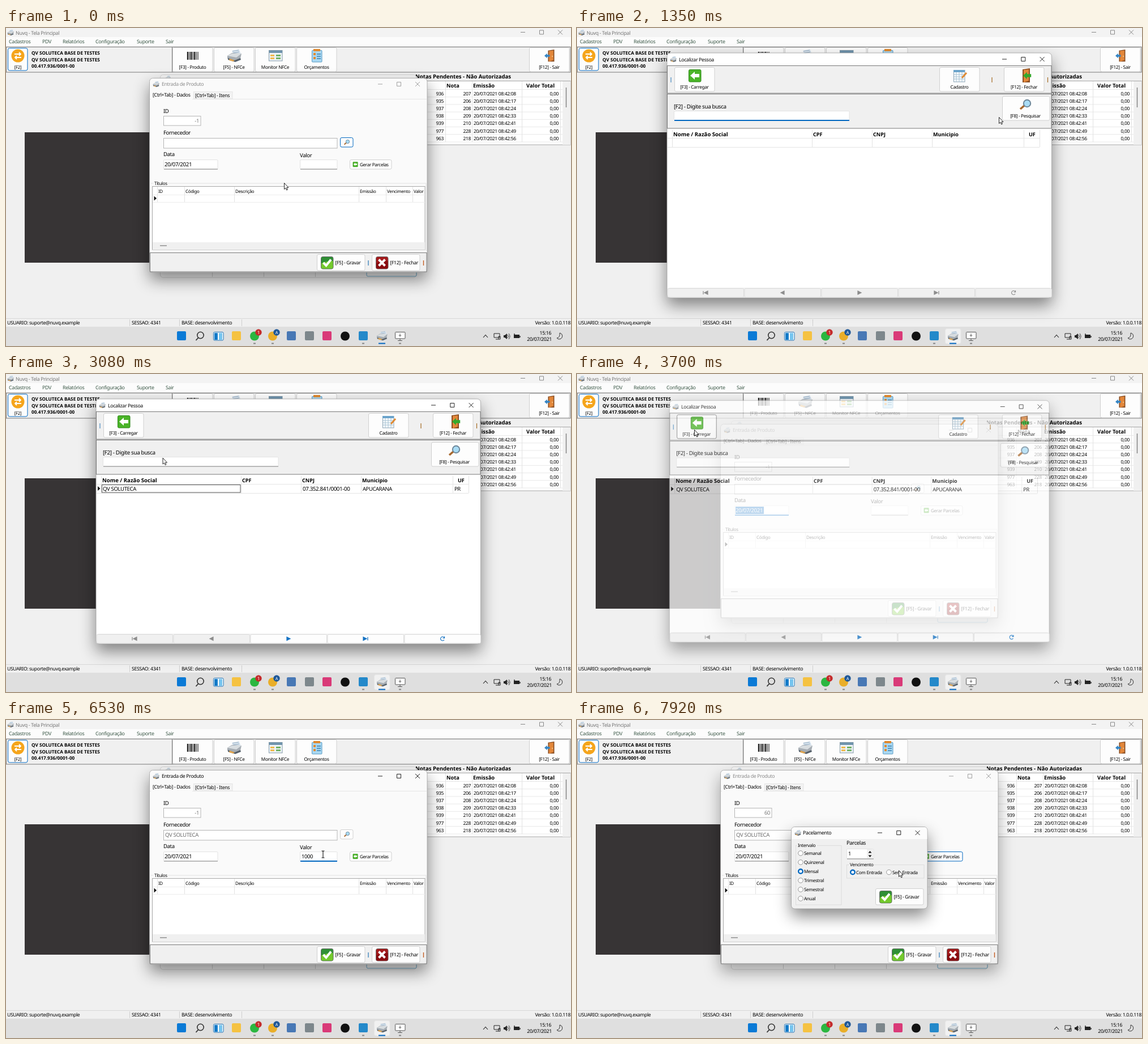
An HTML page for the animation above (7.99 s loop, 998x561 px).

```html
<!DOCTYPE html>
<html lang="pt-BR">
<head>
<meta charset="utf-8">
<title>Entrada de Produto</title>
<style>
html, body { margin: 0; width: 100%; height: 100%; overflow: hidden; background: #f0f0f0 }
svg { display: block; width: 100vw; height: 100vh }
text { font-family: "Noto Sans", "Open Sans", sans-serif; font-weight: 500; letter-spacing: -.04em; text-rendering: geometricPrecision; white-space: pre }
.b { font-weight: 700; letter-spacing: 0 }
.e { text-anchor: end }
.m { text-anchor: middle }
</style>
</head>
<body>
<svg id="stage" viewBox="0 0 998 561" xmlns="http://www.w3.org/2000/svg"></svg>
<script>
const LOOP = 7990, BLUE = '#0067c0', GRAY = '#f0f0f0', EDGE = '#d0d0d0', COMPANY = 'QV SOLUTECA';
const stage = document.getElementById('stage');

// Drawing helpers: every one returns SVG markup.
const text = (x, y, s, size = 8.3, cls = '', fill = '#000', id = '') =>
  `<text x="${x}" y="${y}" font-size="${size}" class="${cls}" fill="${fill}" id="${id}">${s}</text>`;
const box = (x1, y1, x2, y2, fill, stroke = 'none', r = 0, id = '') => {
  const o = stroke == 'none' ? 0 : .5;
  return `<rect x="${x1 + o}" y="${y1 + o}" width="${x2 - x1 - o}" height="${y2 - y1 - o}" rx="${r}" fill="${fill}" stroke="${stroke}" id="${id}"/>`;
};
const path = (d, stroke = '#888', w = 1, fill = 'none') => `<path d="${d}" stroke="${stroke}" stroke-width="${w}" fill="${fill}"/>`;
const shape = (d, fill) => path(d, 'none', 0, fill);
const circle = (x, y, r, fill, stroke = 'none', w = 1) => `<circle cx="${x}" cy="${y}" r="${r}" fill="${fill}" stroke="${stroke}" stroke-width="${w}"/>`;
const group = (id, s, attr = '') => `<g id="${id}" ${attr}>${s}</g>`;
const at = (x, y, s, k = 1) => `<g transform="translate(${x} ${y}) scale(${k})">${s}</g>`;
const verticals = (xs, y1, y2, c = '#e2e2e2') => path(xs.map(x => `M${x + .5} ${y1}V${y2}`).join(''), c);
const field = (x1, y1, x2, y2) => box(x1, y1, x2, y2, '#fff', '#e3e3e3', 1.5) + path(`M${x1 + 1} ${y2}H${x2}`, '#858585');
const button = (x1, y1, x2, y2, id) => box(x1, y1, x2, y2, '#fdfdfd', EDGE, 2.5, id);
const panel = (x1, y1, x2, y2) => box(x1, y1, x2, y2, GRAY, '#787878');
const radio = (x, y, on) => circle(x, y, on ? 3.8 : 4.3, '#fff', on ? BLUE : '#8a8a8a', on ? 2.4 : .9);
const controls = (x, y, gap, c) =>
  path(`M${x - 4} ${y}h8M${x + gap - 3.5} ${y - 3.5}h7v7h-7zM${x + 2 * gap - 4} ${y - 4}l8 8m0 -8l-8 8`, c);
const frame = (x1, y1, x2, y2, fill, id) =>
  `<rect id="${id}" x="${x1}" y="${y1}" width="${x2 - x1}" height="${y2 - y1}" rx="6" fill="${fill}" stroke="#a0a0a0" stroke-width=".8"/>`;

// Icons centred on 0,0.
const printer = shape('M-4 -9L9 -11L12 -3L-2 -1Z', '#dfe9f2') + path('M-3 -8L8 -10M-2 -5L9 -7', '#8aa5bd') +
  shape('M-12 0L-4 -5L13 -4L11 5L2 9L-12 5Z', '#a6adb3') + shape('M-12 0L-4 -4L13 -4L4 3Z', '#d8dde0') +
  shape('M-11 4L1 8L11 4L12 7L2 11L-11 7Z', '#56606a') + shape('M-8 5L1 8L-2 10L-9 8Z', '#e3a650');
const lens = path('M-2 2L-9 8', '#a8682d', 3.6) + circle(3, -2, 6.2, '#a9dcf5', '#6e8799', 2);
const door = shape('M-3 -11L10 -13V12H-3Z', '#8b4e22') + shape('M-1 -10L8 -11L8 9L-1 12Z', '#e3873a') + circle(6, 1, 1, '#fbe9b0');
const arrowLeft = 'M-8 0L0 -7V-3H8V3H0V7Z';
const badge = (top, bottom, mark) => box(-11, -11, 11, 11, top, '#6b6b6b', 3) +
  shape('M-10 1Q0 -3 10.5 -3V8Q10.5 10.5 8 10.5H-8Q-10 10.5 -10 8Z', bottom) + path(mark, '#fff', 4);
const check = badge('#2f8f35', '#74c92d', 'M-6.5 0L-1.5 5L7 -5.5'), cross = badge('#a31a1c', '#8a0c10', 'M-5.5 -5.5L5.5 5.5M5.5 -5.5L-5.5 5.5');
const back = box(-11, -11, 11, 11, '#4ab428', '#2c8719', 2) + shape(arrowLeft, '#fff');
const barcode = path('M-9 -7V7M-3 -7V7M3 -7V7', '#222', 2.4) + path('M-6 -7V7M0 -7V7M6 -7V7M9 -7V7', '#222', 1.2);
const monitor = box(-12, -10, 12, 9, '#eef3f6', '#8299a8') + box(-11, -9, 12, -5, '#6f94ad') +
  shape('M-9 -2h7v3h-7zM-9 3h7v3h-7z', '#f0b94e') + shape('M1 -2h8v3h-8zM1 3h8v3h-8z', '#72b267');
const report = box(-9, -10, 9, 11, '#a9d8f2', '#5b9ac4', 1) + box(-6, -12, 6, -8, '#e08a31') +
  shape('M-6 -5h4v4h-4zM-6 2h4v4h-4z', '#e08a31') + path('M0 -3H7M0 1H7M0 5H7', '#3b7fae', 1.6);
const calendar = box(-11, -10, 9, 11, '#f8fbfd', '#8ba3b5') + shape('M-11 -10H9V-6H-11Z', '#6aa3cb') +
  path('M-10 -2H9M-10 2H9M-10 6H9M-6 -6V11M-1 -6V11M4 -6V11', '#a6c1d2') + path('M4 4L12 -5', '#e08a31', 3);

const toolButton = (x, y, label, icon, k = 1, id = '') =>
  button(x, y, x + 71, y + 43, id) + at(x + 36, y + 15, icon, k) + text(x + 35.5, y + 37.8, label, 8.2, 'm');
const saveButton = (x, y, label, icon) => button(x, y, x + 85, y + 29) + at(x + 18, y + 15, icon) + text(x + 32.5, y + 18, label, 8.6);

function desktop() {
  const rows = [[936, 207, '08'], [935, 206, '17'], [937, 208, '24'], [938, 209, '33'], [939, 210, '41'], [977, 228, '49'], [963, 218, '56']];
  const menu = { Cadastros: 5, PDV: 64, Relatórios: 100, Configuração: 158, Suporte: 231, Sair: 282 };
  return box(0, 0, 998, 561, GRAY) + box(0, 0, 998, 16, '#f3f3f3') + box(0, 16, 998, 32, '#fcfcfc') +
    at(8, 8, printer, .45) + text(17, 11.5, 'Nuvq - Tela Principal', 8.9, '', '#777') + controls(913, 7.5, 33, '#888') +
    Object.entries(menu).map(([s, x]) => text(x, 27, s, 8.9, '', '#3c5948')).join('') +
    panel(0, 33, 997, 78) + verticals([293], 33, 78, '#787878') +
    box(3, 35, 38, 75, '#fdfdfd', BLUE, 3) + circle(21, 49, 11.5, '#f5a51c') +
    path('M15 46H26M23 43L26 46L23 49M27 52H16M19 49L16 52L19 55', '#fff', 1.8) + text(21, 72, '[F2]', 7.8, 'm') +
    [COMPANY + ' BASE DE TESTES', COMPANY + ' BASE DE TESTES', '00.417.936/0001-00'].map((s, i) => text(45, 47 + i * 11.6, s, 8.2, 'b')).join('') +
    toolButton(294, 34, '[F3] - Produto', barcode) + toolButton(367, 34, '[F5] - NFCe', printer) +
    toolButton(440, 34, 'Monitor NFCe', monitor) + toolButton(513, 34, 'Orçamentos', report) +
    toolButton(924, 34, '[F12] - Sair', door + at(-5, 0, shape(arrowLeft, '#3585c4'), .7), .85) +
    box(33, 184, 263, 414, '#373435') +
    text(723, 88.5, 'Notas Pendentes - Não Autorizadas', 9.6, 'b') +
    box(700, 93, 997, 206, '#fff', '#a8a8a8') + box(983, 94, 997, 206, GRAY) + path('M989.5 105V140', '#858585', 1.5) +
    path(rows.map((_, i) => `M700 ${108.5 + i * 13.2}H983`).join('') + 'M700 201H983', '#e8e8e8') + verticals([776, 823, 911, 979], 94, 201) +
    text(778, 104.5, 'Nota', 9.2, 'b') + text(825, 104.5, 'Emissão', 9.4, 'b') + text(919, 104.5, 'Valor Total', 9.4, 'b') +
    rows.map(([id, note, sec], i) => {
      const y = 118.6 + i * 13.2;
      return text(773, y, id, 8.5, 'e') + text(821, y, note, 8.5, 'e') +
        text(826, y, '20/07/2021 08:42:' + sec, 8.5) + text(976, y, '0,00', 8.5, 'e');
    }).join('') +
    box(272, 82, 725, 440, '#f5f5f5', '#d2d2d2', 5) + at(286, 88, printer, .35) + verticals([364, 455, 546], 430, 439, '#ccc') +
    path('M637 430V436Q637 438 639 438H723Q725 438 725 436V430', '#6ba9c9') +
    path('M0 512.5H998', '#d8d8d8') + verticals([218, 306, 416], 514, 526, '#cfcfcf') +
    text(2, 523, 'USUARIO: suporte@nuvq.example', 8.6) + text(222, 523, 'SESSAO: 4341', 8.7) +
    text(310, 523, 'BASE: desenvolvimento', 8.8) + text(997, 523, 'Versão: 1.0.0.118', 8.6, 'e') + taskbar();
}

function taskbar() {
  const squares = { 310: '#0a7ad6', 407: '#f5c242', 504: '#4878b5', 536: '#7d878c', 567: '#d93a78', 631: '#2489ca' };
  const discs = { 439: '#2bb741', 471: '#e9ae29', 599: '#111' };
  return box(0, 527, 998, 561, '#dfdfdf') + box(650, 530, 678, 557, '#f1f1f1', '#e6e6e6', 3, 'highlight') +
    Object.entries(squares).map(([x, c]) => box(x - 8, 535, +x + 8, 551, c, 'none', 2)).join('') +
    Object.entries(discs).map(([x, c]) => circle(x, 543.5, 8, c)).join('') +
    circle(343.5, 542, 5.7, 'none', '#333', 1.6) + path('M339.5 546.5L335.5 551', '#333', 1.8) +
    box(366, 536, 384, 551, '#fff', '#176fb5', 2) + shape('M368 538h6v12h-6z', '#157bc8') + shape('M376 538h6v12h-6z', '#76c5ef') +
    circle(446, 537, 5.7, '#c42b2b') + text(446, 540, '1', 8, 'm', '#fff') +
    circle(478, 537, 5.7, '#1d5797') + text(478, 540, 'A', 7.5, 'm', '#fff') +
    at(664, 543, printer, .75) + box(687, 536, 705, 548, '#fff', '#555', 1) + path('M696 539v5M694 542l2 2l2 -2M692 551.5h8M696 548v3', '#555') +
    path('M437 556.5h4M469 556.5h4M629 556.5h4M694 556.5h4', '#858585', 1.8) + path('M658 556.5h12', BLUE, 2) +
    path('M843 546L847 541.5L851 546', '#222', 1.1) + path('M862 539h10v7h-10zM865 549h5M870 544h3v5h-3z', '#222') +
    shape('M879 542h2l4 -3v10l-4 -3h-2z', '#222') + path('M886 541q3 3 0 6M888 539q4 5 0 10', '#222', .9) +
    box(897, 541, 907, 547, '#222') + path('M908 543v3M898 539v4', '#222', 1.3) +
    text(963, 541, '15:16', 8.7, 'e') + text(964, 552, '20/07/2021', 8.9, 'e') +
    path('M978 538A5.5 5.5 0 1 1 973 547Q979 546 978 538Z', '#333');
}

function entryWindow() {
  const columns = { ID: 269, Código: 317, Descrição: 405, Emissão: 625, Vencimento: 673, Valor: 720 };
  return frame(253.5, 88.5, 744, 431, '#fafafa', 'entryFrame') + at(265, 99, printer, .45) +
    text(275, 102.3, 'Entrada de Produto', 8.8, '', '#000', 'entryTitle') + group('entryControls', controls(661, 99, 33, 'inherit')) +
    path('M254 125.5H743', '#e5e5e5') + box(331, 112, 400, 125, '#f3f3f3', '#e5e5e5') + box(256, 110, 329, 127, '#fafafa') +
    text(259, 121.3, '[Ctrl+Tab] - Dados', 8.7) + text(334, 122, '[Ctrl+Tab] - Itens', 8.7) +
    text(278, 150, 'ID', 9.6) + box(278, 155, 344, 172, '#fff', '#b5b5b5') + text(341, 167, '-1', 9.4, 'e', '#777', 'entryId') +
    text(278, 188, 'Fornecedor', 9.6) + box(278, 194, 585, 212, '#fff', '#b5b5b5') + text(281, 206.3, COMPANY, 9.6, '', '#6d6d6d', 'supplier') +
    button(590, 193, 613, 210, 'searchButton') + at(602, 201.5, lens, .5) +
    text(278, 226, 'Data', 9.6) + field(278, 232, 374, 249) + box(280, 234, 330, 247, BLUE, 'none', 0, 'dateMark') +
    text(280, 244, '20/07/2021', 9.8, '', '#000', 'date') + group('dateFocus', path('M279 249H374', BLUE, 1.8)) +
    text(519, 228, 'Valor', 9.6) + field(519, 232, 585, 249) + box(521, 234, 542, 247, BLUE, 'none', 0, 'valueMark') +
    text(522, 244, '', 9.4, '', '#000', 'value') + group('valueFocus', path('M520 249H585', BLUE, 1.8)) +
    button(607, 232, 681, 249, 'splitButton') + at(617, 240.5, back, .4) +
    text(625, 243.5, 'Gerar Parcelas', 8.1) +
    path('M256 274H260M286 274H742V393', '#e1e1e1') + text(262, 277, 'Títulos', 8) +
    box(258, 279, 740, 391, '#fff', '#a8a8a8') + path('M259 294.5H740M259 307.5H740', '#ededed') +
    verticals([267, 315, 403, 623, 671, 718], 280, 307) +
    Object.entries(columns).map(([s, x]) => text(x, 290.8, s, 7.9)).join('') + shape('M261.5 296.5L266 300.5L261.5 304.5Z', '#111') +
    box(259, 378, 740, 391, GRAY) + path('M272 384H284', '#777', 1.2) +
    panel(254, 396, 743, 430) + saveButton(549, 399, '[F5] - Gravar', check) + saveButton(646, 399, '[F12] - Fechar', cross) +
    path('M640 410V419', '#2274b5', 1.2) + path('M737.5 410V419', '#c25c20', 1.4);
}

function finderWindow() {
  const nav = ['M-4 -3v6M4 -3v6l-6 -3z', 'M3 -3v6l-6 -3z', 'M-3 -3v6l6 -3z', 'M4 -3v6M-4 -3v6l6 -3z', 'M3 -2a3.5 3.5 0 1 0 0 4M3.5 -4v3h-3'];
  const heads = { 'Nome / Razão Social': 170, CPF: 417, CNPJ: 523, Municipio: 629, UF: 798 };
  return frame(159, 44, 838.5, 476, '#fff', 'finderFrame') + at(170, 55, printer, .45) + text(180, 58.5, 'Localizar Pessoa', 8.8) + controls(755, 55, 33.3, '#222') +
    panel(159, 66, 838, 115) + panel(159, 116, 838, 177) +
    toolButton(172, 69, '[F3] - Carregar', back, 1, 'loadButton') + toolButton(640, 69, 'Cadastro', calendar) +
    toolButton(754, 69, '[F12] - Fechar', door + at(5, 0, shape(arrowLeft, '#35a92d'), .9)) +
    path('M166 87V96', '#2274b5') + path('M733 87V96M831.5 87V96', '#a46a22', 1.2) +
    text(171, 142, '[F2] - Digite sua busca', 9.9) + field(171, 146, 481, 163) + group('queryFocus', path('M172 163H481', BLUE, 1.8)) +
    button(751, 120, 835, 163) + at(792, 135, lens) + text(792, 157.8, '[F8] - Pesquisar', 8.2, 'm') +
    path('M160 194.5H817M160 210.5H817', '#e5e5e5') + verticals([168, 415, 521, 627, 789, 817], 180, 210) +
    Object.entries(heads).map(([s, x]) => text(x, 191, s, x == 170 ? 9.6 : 9.1, 'b')).join('') +
    group('result', shape('M162 198L166.5 202L162 206Z', '#111') + text(171, 206.3, COMPANY, 9.6) +
      text(524, 206.3, '07.352.841/0001-00', 9.8) + text(630, 206.3, 'APUCARANA', 9.4) + text(792, 206.3, 'PR', 9.4)) +
    box(169, 195, 414, 209, 'none', '#555', 0, 'rowFocus') +
    box(160, 458, 838, 475, GRAY, 'none', 5) +
    nav.map((d, i) => {
      const x = 159.5 + i * 136;
      return box(x, 459, x + 135, 475, GRAY, '#dcdcdc', 2, i > 1 ? 'nav' + i : '') +
        group(i > 1 ? 'navIcon' + i : '', at(x + 67.5, 467, `<path d="${d}" stroke-width="1.2" fill-opacity="${i == 4 ? 0 : 1}"/>`), 'fill="#8d8d8d" stroke="#8d8d8d"');
    }).join('');
}

function installmentWindow() {
  const periods = ['Semanal', 'Quinzenal', 'Mensal', 'Trimestral', 'Semestral', 'Anual'];
  return frame(378.5, 188.5, 619, 333, GRAY, 'planFrame') + shape('M379 210V195Q379 189 385 189H613Q618.5 189 618.5 195V210Z', '#fcfcfc') +
    at(390, 199, printer, .45) + text(399, 202.4, 'Pacelamento', 8.9) + controls(535, 199, 33.3, '#222') +
    box(386, 221, 467, 326, 'none', '#dcdcdc') + box(388, 217, 424, 225, GRAY) + text(390, 224.3, 'Intervalo', 8.1) +
    periods.map((s, i) => radio(395, 235 + i * 16, i == 2) + text(401, 238 + i * 16, s, 8.1)).join('') +
    text(476, 220, 'Parcelas', 9.5) + field(476, 227, 524, 245) + text(479, 239, '1', 9.4) +
    box(512, 228, 523, 244, GRAY) + shape('M514.5 234.5L517.5 231L520.5 234.5ZM514.5 238.5L517.5 242L520.5 238.5Z', '#111') +
    box(476, 255, 613, 279, 'none', '#dcdcdc') + box(480, 251, 524, 259, GRAY) + text(482, 258, 'Vencimento', 8) +
    radio(487, 268.5, true) + text(493, 271.6, 'Com Entrada', 8.1) + radio(551, 268.5) + text(557, 271.6, 'Sem Entrada', 8.1) +
    saveButton(527, 297, '[F5] - Gravar', check);
}

stage.innerHTML = desktop() + group('entry', entryWindow()) + group('finder', finderWindow()) + group('plan', installmentWindow()) +
  group('cursor', group('arrow', path('M.5 .5V11.5L3 9.3L4.7 13L6.4 12.2L4.8 8.6H8Z', '#111', .9, '#fff')) +
    group('beam', path('M-2.5 -6H-.7L0 -5.4L.7 -6H2.5M0 -5.4V5.4M-2.5 6H-.7L0 5.4L.7 6H2.5', '#111', 1.1)));

const $ = id => document.getElementById(id);
const clamp = v => Math.max(0, Math.min(1, v));
const ramp = (t, a, b) => clamp((t - a) / (b - a));
const show = (id, on) => $(id).setAttribute('display', on ? 'inline' : 'none');
const paint = (id, key, value) => $(id).setAttribute(key, value);
const shadow = (id, alpha) => $(id).style.filter = `drop-shadow(0 13px 14px rgba(0,0,0,${alpha}))`;

const mouse = [[0, 491, 273], [650, 491, 273], [1280, 745, 157], [1350, 745, 157], [1480, 775, 148], [1760, 775, 148],
  [2180, 388, 175], [2640, 350, 200], [2750, 350, 200], [3400, 207, 98], [3800, 207, 98], [4330, 335, 276], [4580, 608, 252],
  [4730, 538, 241], [4870, 538, 241], [5140, 560, 237], [6530, 560, 237], [6900, 648, 243], [7370, 648, 243], [7920, 568, 265], [LOOP, 568, 265]];

function mouseAt(t) {
  const i = mouse.findIndex(k => k[0] > t), [a, x, y] = mouse[i - 1], [b, x2, y2] = mouse[i];
  const p = ramp(t, a, b), e = p * p * (3 - 2 * p);
  return [x + (x2 - x) * e, y + (y2 - y) * e];
}

function popup(id, cx, cy, opening, closing) {
  const shown = opening * (1 - closing), scale = .9 + .1 * (1 - (1 - opening) ** 3) - .05 * closing;
  show(id, shown > 0);
  paint(id, 'opacity', shown);
  paint(id, 'transform', `translate(${cx} ${cy}) scale(${scale}) translate(${-cx} ${-cy})`);
}

function render(t) {
  const active = t >= 3830 && t < 7100, found = t >= 1600;
  shadow('entryFrame', active ? .46 : t < 400 ? .46 - .12 * ramp(t, 70, 380) : .34);
  paint('entryTitle', 'fill', active ? '#000' : '#8a8a8a');
  $('entryControls').firstChild.setAttribute('stroke', active ? '#222' : '#a0a0a0');
  show('highlight', t >= 200);
  paint('searchButton', 'stroke', t < 3600 ? BLUE : EDGE);
  show('supplier', t >= 3830);

  const dateOn = t >= 3640 && t < 4900, valueOn = t >= 4900 && t < 6950, selected = t >= 4900 && t < 5470;
  show('dateMark', dateOn);
  show('dateFocus', dateOn);
  paint('date', 'fill', dateOn ? '#fff' : '#000');
  show('valueMark', selected);
  show('valueFocus', valueOn);
  paint('value', 'fill', selected ? '#fff' : '#000');
  const typed = [5470, 5670, 5870, 6000].filter(k => t >= k).length;
  $('value').textContent = selected ? '0,00' : '1000'.slice(0, typed);
  $('entryId').textContent = t >= 7000 ? '60' : '-1';
  paint('splitButton', 'stroke', t >= 6950 ? BLUE : EDGE);

  popup('finder', 498.5, 260, ramp(t, 490, 740), ramp(t, 3640, 3880));
  show('queryFocus', t < 1480);
  show('result', found);
  show('rowFocus', found && t < 3420);
  paint('loadButton', 'stroke', t >= 3420 ? '#777' : EDGE);
  for (const i of [2, 3, 4]) {
    paint('nav' + i, 'fill', found ? '#fdfdfd' : GRAY);
    for (const key of ['fill', 'stroke']) paint('navIcon' + i, key, found ? '#1573c4' : '#8d8d8d');
  }
  popup('plan', 498.5, 260.5, ramp(t, 7200, 7450), 0);

  const [x, y] = mouseAt(t), beam = t > 4500 && t < 7000 && x > 519 && x < 585 && y > 230 && y < 250;
  paint('cursor', 'transform', `translate(${x} ${y})`);
  show('arrow', !beam);
  show('beam', beam);
}

shadow('finderFrame', .46);
shadow('planFrame', .46);
const start = performance.now();
(function tick() {
  render((performance.now() - start) % LOOP);
  requestAnimationFrame(tick);
})();
</script>
</body>
</html>
```
